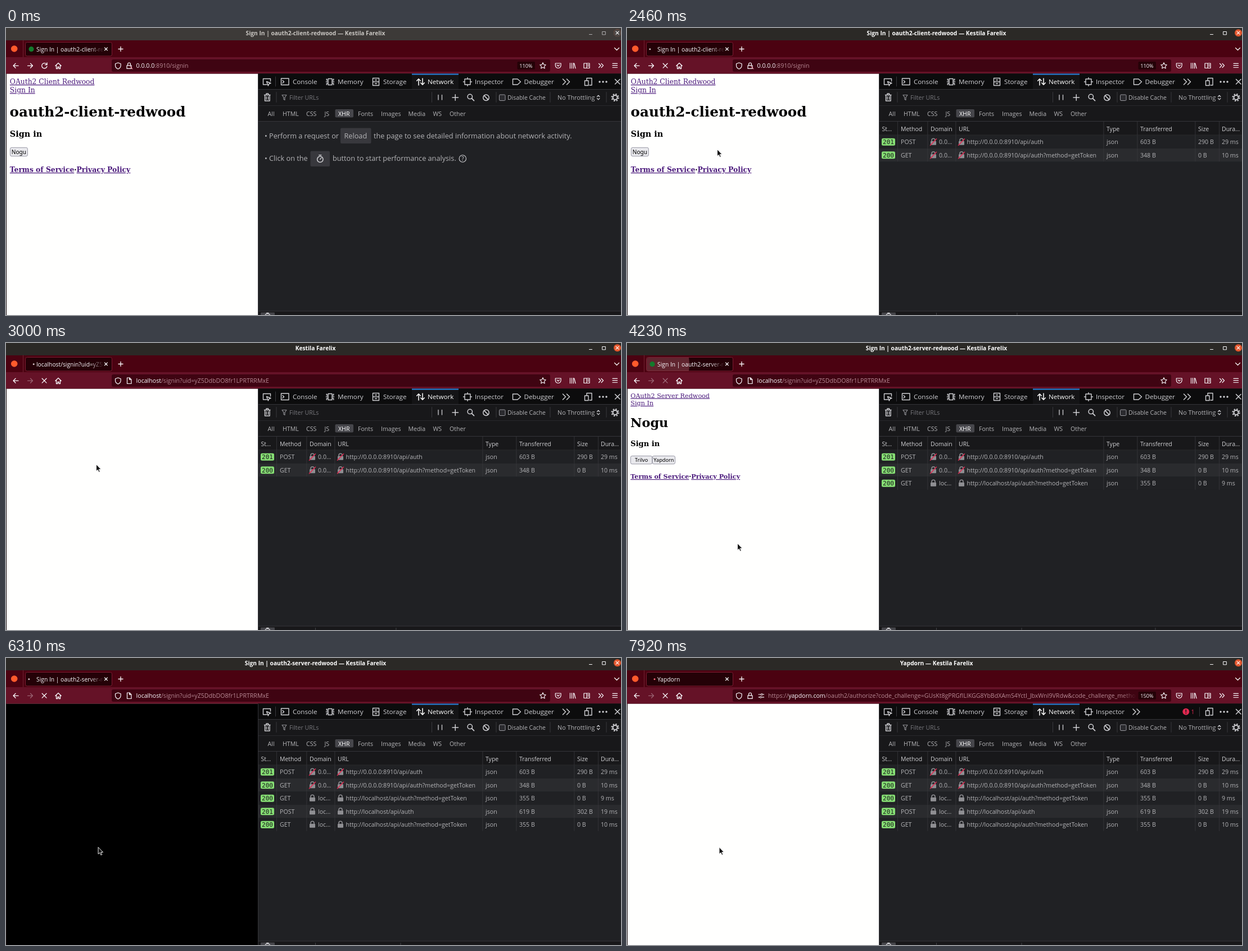
Animation of 1094x512 px, one loop 8 s. Source, as an HTML page:

```html
<!DOCTYPE html>
<html lang="en">
<head>
<meta charset="utf-8">
<title>Sign-in flow</title>
<style>
  html, body { margin: 0; width: 100%; height: 100%; overflow: hidden; background: #000; }
  svg { display: block; width: 1094px; height: 512px; }
  text { font-family: "Open Sans", "Noto Sans", sans-serif; white-space: pre; }
  .serif { font-family: "DejaVu Serif", serif; }
  .mono { font-family: "DejaVu Sans Mono", monospace; }
  .bold { font-weight: 700; }
  .link { fill: #4b1a7c; text-decoration: underline; }
</style>
</head>
<body>
<svg id="stage" viewBox="0 0 1094 512">
  <defs>
    <clipPath id="tabClip"><rect x="35" y="26" width="153" height="24" rx="3"/></clipPath>
    <clipPath id="labelClip"><rect x="54" y="26" width="119" height="24"/></clipPath>
    <clipPath id="urlClip"><rect x="230" y="56" width="675" height="22"/></clipPath>
    <linearGradient id="tabFade"><stop stop-color="#240107" stop-opacity="0"/><stop offset="1" stop-color="#240107"/></linearGradient>
    <linearGradient id="urlFade"><stop stop-color="#3f0412" stop-opacity="0"/><stop offset="1" stop-color="#3f0412"/></linearGradient>
  </defs>
</svg>
<script>
const LOOP = 8000, FPS = 13, END = LOOP + 1;
const BROWSER = 'Kestila Farelix';
const LIGHT = '#fbfbfe', PINK = '#b88a95', GREY = '#b4b4b7', ICON = '#d0d0d4';
const stage = document.getElementById('stage');
let layer = stage;
const timed = [];

function el(tag, attrs = {}, parent = layer) {
  const node = document.createElementNS('http://www.w3.org/2000/svg', tag);
  for (const key in attrs) node.setAttribute(key, attrs[key]);
  parent.appendChild(node);
  return node;
}
const rect = (x, y, width, height, fill, more) => el('rect', { x, y, width, height, fill, ...more });
const dot = (cx, cy, r, fill, more) => el('circle', { cx, cy, r, fill, ...more });
const stroke = (d, color = LIGHT, width = 1.3, more) =>
  el('path', { d, stroke: color, 'stroke-width': width, fill: 'none', 'stroke-linejoin': 'round', 'stroke-linecap': 'round', ...more });
function text(x, y, str, size, fill, more) {
  const node = el('text', { x, y, 'font-size': size, fill, ...more });
  node.textContent = str;
  return node;
}
function group(draw, attrs) {
  const outer = layer, g = el('g', attrs);
  layer = g;
  draw();
  layer = outer;
  return g;
}
// Draws a group that is visible only inside the given [from, to) spans.
function during(spans, draw) {
  const g = group(draw);
  timed.push({ g, spans });
  return g;
}
const inside = (spans, t) => spans.some(([a, b]) => t >= a && t < b);

const FOCUS = 1310, LEAVE = 2770, SERVER = 3770, ARRIVE = 4080, READY = 4690;
const LOAD1 = 1690, LOAD2 = 5850, DARK = 6310, AUTH = 6770, WHITE = 7310, ALERT = 7000;

function link(x, y, str, size) {
  text(x, y, str, size, null, { class: 'serif link' });
}
function footer(x, y, size) {
  const line = el('text', { x, y, 'font-size': size, class: 'serif bold' });
  for (const [str, cls] of [['Terms of Service', 'link'], ['·', ''], ['Privacy Policy', 'link']])
    el('tspan', { class: cls }, line).textContent = str;
}
function button(x, y, w, h, str, size, hover, press) {
  const edge = { rx: 2.6, stroke: '#8f8f9d', 'stroke-width': 0.9 };
  rect(x, y, w, h, '#e9e9ed', edge);
  if (hover) during(hover, () => rect(x, y, w, h, '#cfcfd7', { ...edge, stroke: '#676774' }));
  if (press) during(press, () => rect(x, y, w, h, '#b1b1b9', { ...edge, stroke: '#484851' }));
  text(x + w / 2, y + h / 2 + size * 0.36, str, size, '#000', { 'text-anchor': 'middle', style: 'font-family:"Noto Sans",sans-serif' });
}

// Page area
rect(0, 0, 1094, 512, '#160c0e');
rect(1, 81.5, 447, 431, '#fffffe');
during([[0, LEAVE]], () => {
  link(6.8, 100, 'OAuth2 Client Redwood', 12.32);
  link(6.8, 115.2, 'Sign In', 12.32);
  text(6.6, 158, 'oauth2-client-redwood', 24.64, '#000', { class: 'serif bold' });
  text(6.8, 194.4, 'Sign in', 14.4, '#000', { class: 'serif bold' });
  button(7.4, 213.3, 31, 15.4, 'Nogu', 10.1, [[1080, 1540]], [[1230, 1310]]);
  footer(6.8, 257, 12.32);
});
during([[SERVER, DARK]], () => {
  link(6.3, 97.6, 'OAuth2 Server Redwood', 11.2);
  link(6.3, 111, 'Sign In', 11.2);
  text(6, 150, 'Nogu', 22.4, '#000', { class: 'serif bold' });
  text(6.2, 184, 'Sign in', 13.1, '#000', { class: 'serif bold' });
  button(6.5, 201.5, 38.2, 14.4, 'Trilvo', 9.2);
  button(45.3, 201.5, 40.2, 14.4, 'Yapdorn', 9.2, [[5000, 5540]], [[5230, 5310]]);
  footer(6.3, 242, 11.2);
});
during([[DARK, WHITE]], () => rect(1, 81.5, 447, 431, '#000'));

// Title bar
rect(0, 0, 1094, 22, '#2b2926');
during([[0, FOCUS]], () => rect(0, 0, 1094, 22, '#3d3a38'));
const title = text(550.5, 12.8, '', 10.2, '#fff', { class: 'bold', 'text-anchor': 'middle' });
const buttons = group(() => {
  stroke('M1037.5 11.5h5', LIGHT, 1.1);
  stroke('M1061 6.5h5.4v5.4h-5.4z', LIGHT, 1);
});
dot(1087.5, 8.7, 6.5, '#e4572e');
during([[0, FOCUS]], () => dot(1087.5, 8.7, 6.5, '#4b4745'));
stroke('M1085 6.2l5 5m0-5l-5 5', '#fff', 1.2);

// Tab strip
rect(0, 22, 1094, 30, '#4b0211');
dot(14.7, 37, 5.8, '#ff5a2c');
stroke('M30.5 22v30', '#7b2b3a', 0.8);
rect(34.5, 25.5, 154, 24.5, '#240107', { rx: 3, stroke: '#7c1c31', 'stroke-width': 1 });
const burst = dot(45, 38, 10, '#a85160', { 'clip-path': 'url(#tabClip)' });
during([[0, LOAD1], [ARRIVE, LOAD2]], () => dot(45, 37.7, 4.6, '#137a2c'));
const spinner = dot(45, 37.8, 1.5, '#c9b3b7');
const label = text(54, 41.6, '', 10.3, LIGHT, { 'clip-path': 'url(#labelClip)' });
rect(148, 28, 26, 20, 'url(#tabFade)');
stroke('M175.4 35l5 5m0-5l-5 5', LIGHT, 1.1);
stroke('M200 37.5h8m-4-4v8', LIGHT, 1.3);
stroke('M1082.5 35.5l4 4 4-4', LIGHT, 1.2);

// Navigation bar
rect(0, 52, 1094, 29.5, '#651227');
during([[230, 380]], () => rect(6, 56, 25, 22, '#7d3044', { rx: 3 }));
stroke('M22 67.3h-9m4-4l-4 4 4 4');
const forward = stroke('M38.5 67.3h9m-4-4l4 4-4 4');
during([[0, LOAD1], [READY, LOAD2]], () => stroke('M72 64.3a4.7 4.7 0 1 0 .9 4.2M73 62v3.6h-3.6'));
const stop = during([[LOAD1, READY], [LOAD2, END]], () => stroke('M64.2 63.3l7.8 7.8m0-7.8l-7.8 7.8'));
stroke('M87.8 67.5l5.2-5 5.2 5M89.5 66.3v6.2h2.4v-3h2.2v3h2.4v-6.2');
rect(188, 56, 780, 22, '#3f0412', { rx: 3 });
stroke('M199.3 62l4.8 1.8v3.2c0 3-2 5-4.8 6.2c-2.8-1.2-4.8-3.2-4.8-6.2v-3.2z', LIGHT, 1.2);
const padlock = () => {
  stroke('M215 66.8h8v5.6h-8zM216.6 66.8v-2.4a2.4 2.4 0 0 1 4.8 0v2.4', LIGHT, 1.2);
};
function address(x, parts) {
  const line = el('text', { x, y: 71, 'font-size': 10.6, 'clip-path': 'url(#urlClip)' });
  for (const [str, fill] of parts) el('tspan', { fill }, line).textContent = str;
}
function zoom(str) {
  rect(909.5, 60, 31.5, 14, '#240107', { rx: 2 });
  text(925, 70.6, str, 9.2, LIGHT, { 'text-anchor': 'middle' });
}
during([[0, LEAVE]], () => {
  padlock();
  stroke('M221 68.5l4 4.5', '#ff9aa8', 1.1);
  address(231.6, [['0.0.0.0', LIGHT], [':8910/signin', PINK]]);
  zoom('110%');
});
during([[LEAVE, AUTH]], () => {
  stroke('M215.5 62h4.2l3.2 3.2v7.3h-7.4zM219.5 62v3.4h3.4', LIGHT, 1.2);
  address(231.6, [['localhost', LIGHT], ['/signin?uid=yZ5DdbDO8fr1LPRTRRMxE', PINK]]);
});
during([[AUTH, END]], () => {
  padlock();
  stroke('M234 65h4m3.6 0h2M234 69.8h2m4 0h3.6', LIGHT, 1.2);
  dot(239.8, 65, 1.5, 'none', { stroke: LIGHT });
  dot(237.8, 69.8, 1.5, 'none', { stroke: LIGHT });
  address(251, [['https://', PINK], ['yapdorn.com', LIGHT],
    ['/oauth2/authorize?code_challenge=GUsKt8gPRGfILlKGG8YbBdXAmS4YctI_JbxWnI9VRdw&code_challenge_method=S256', PINK]]);
  rect(880, 58, 26, 18, 'url(#urlFade)');
  zoom('150%');
});
stroke('M955 61.8l1.6 3.4 3.7.5-2.7 2.6.7 3.7-3.3-1.8-3.3 1.8.7-3.7-2.7-2.6 3.7-.5z', LIGHT, 1.1);
stroke('M977.3 63h9.8v3.6a4.9 4.9 0 0 1-9.8 0zM980 65.8l2.2 2.2 2.2-2.2', LIGHT, 1.2);
stroke('M1003.5 62.5v9.5m3-9.5v9.5m3-9.5v9.5m1.2-9l2.4 9', LIGHT, 1.2);
stroke('M1028 63h10v8.5h-10zM1033 63v8.5m1.8-6h1.6m-1.6 2.4h1.6', LIGHT, 1.2);
stroke('M1054.5 63.5l3.5 3.5-3.5 3.5m4.5-7l3.5 3.5-3.5 3.5', LIGHT, 1.2);
stroke('M1079 63.3h8.5m-8.5 3.6h8.5m-8.5 3.6h8.5', LIGHT, 1.2);

// Developer tools: panel tabs
rect(448, 81.5, 646, 431, '#202124');
rect(448, 81.5, 646, 27.5, '#0c0c0d');
rect(448, 109, 646, 57, '#18181a');
rect(448, 109, 646, 0.9, '#38383d');
rect(448, 138, 646, 0.9, '#2b2b2f');
rect(448, 166, 646, 0.9, '#38383d');
rect(448, 81.5, 0.9, 431, '#38383d');
rect(722, 81.5, 83, 27.5, '#141416');
rect(722, 81.5, 83, 2, '#2a84e0');
stroke('M464 101h-6.5v-10.5h13v4.5M463.5 95.5l7.5 3-3.2 1.2-1.4 3.2z', ICON, 1.4);
stroke('M479.5 87v17', '#38383d', 1);
const panel = (x, str, color = ICON) => text(x, 100, str, 11.65, color);
panel(510, 'Console');
stroke('M489.5 90h13.5v11.5h-13.5zM492 93.5l2.6 2.4-2.6 2.4', ICON, 1.4);
panel(590, 'Memory');
stroke('M573 90.5h7v11h-7zM573 93h-2.7v-2m2.7 5h-3.5m3.5 3h-2.7v2.2M580 93h2.7v-2m-2.7 5h3.5m-3.5 3h2.7v2.2', ICON, 1.4);
panel(671, 'Storage');
stroke('M652.5 89.5h11v13h-11zM652.5 96h11m-7-3.2h3m-3 6.5h3', ICON, 1.4);
panel(750, 'Network', '#fff');
stroke('M734 102v-11m-3.3 3.2l3.3-3.4 3.3 3.4M741 90v11m-3.3-3.2l3.3 3.4 3.3-3.4', '#fff', 1.5);
panel(834, 'Inspector');
stroke('M816 91h10v10h-10zM821 88.5v2.5m0 10v2.5m-7.5-7.5h2.5m10 0h2.5', ICON, 1.4);
const more = x => stroke(`M${x} 91l5 5-5 5m7-10l5 5-5 5`, ICON, 1.5);
during([[0, ALERT]], () => {
  stroke('M901.5 91h8.5l5.5 5-5.5 5h-8.5z', ICON, 1.4);
  panel(921.5, 'Debugger');
  more(990.5);
});
during([[ALERT, END]], () => {
  more(900);
  dot(994.3, 95.8, 6, '#e22850');
  stroke('M994.3 92.6v3.4m0 2.4v.3', '#18181a', 1.6);
  text(1003.6, 99.5, '1', 10.4, '#e22850');
  stroke('M1018.5 88v16', '#38383d', 1);
});
stroke('M1033 93v-3.5h9v12.5h-4M1029.5 94h6.5v8.5h-6.5z', ICON, 1.4);
for (const x of [1056, 1062, 1068]) dot(x, 96, 1.7, ICON);
stroke('M1083.5 91.5l8.5 8.5m0-8.5l-8.5 8.5', ICON, 1.5);

// Filter rows
const small = (x, y, str, color = GREY, size = 10.6) => text(x, y, str, size, color);
stroke('M459.5 119.5h10.5M463 119v-2h3.6v2M460.5 120v10h8.6v-10M463 122.5v5m3.6-5v5', ICON, 1.4);
for (const x of [481, 757.5, 872, 968, 1068]) stroke(`M${x} 114.5v18`, '#38383d', 1);
stroke('M491 119.5h8l-3 4.3v4.7l-2-1.3v-3.4z', '#8a8a8f', 1.2);
small(504, 127.7, 'Filter URLs', '#77777c');
stroke('M769 119.5v8.5m6.5-8.5v8.5', ICON, 1.3);
stroke('M794 124h10.5m-5.25-5.25v10.5', ICON, 1.5);
stroke('M828.5 125.6l4 4', ICON, 1.8);
dot(825.3, 122.4, 4.2, 'none', { stroke: ICON, 'stroke-width': 1.5 });
dot(854, 124.2, 5.2, 'none', { stroke: ICON, 'stroke-width': 1.5 });
stroke('M850.5 120.6l7 7', ICON, 1.5);
rect(877.5, 119, 10.5, 10.5, '#2a2a2e', { rx: 1.5, stroke: '#9a9aa0', 'stroke-width': 1 });
small(892, 127.7, 'Disable Cache', GREY, 10.4);
small(981, 127.7, 'No Throttling', GREY, 10.8);
stroke('M1051.5 122.5l2.2-2.4 2.2 2.4m-4.4 3l2.2 2.4 2.2-2.4', ICON, 1.2);
dot(1083.5, 124, 4, 'none', { stroke: ICON, 'stroke-width': 2 });
dot(1083.5, 124, 6.1, 'none', { stroke: ICON, 'stroke-width': 2, 'stroke-dasharray': '2.4 2.39' });
rect(585.5, 145, 32.5, 14.5, '#46464b', { rx: 2 });
for (const [x, str] of [[465.5, 'All'], [492, 'HTML'], [534, 'CSS'], [566.5, 'JS'], [591, 'XHR'],
  [626, 'Fonts'], [667, 'Images'], [715.5, 'Media'], [759.5, 'WS'], [789, 'Other']])
  small(x, 156.8, str, str === 'XHR' ? '#fff' : GREY);

// Empty request list
const TABLE = 1540;
const stopwatch = (x, y) => {
  dot(x, y + 1, 5.2, 'none', { stroke: ICON, 'stroke-width': 1.5 });
  stroke(`M${x - 2} ${y - 6.5}h4m-2 7.5l2-2.4`, ICON, 1.4);
};
during([[0, TABLE]], () => {
  const note = (x, y, str) => text(x, y, str, 12.7, GREY);
  note(460, 197.3, '• Perform a request or');
  rect(595, 178.5, 54.5, 27.5, '#38383d', { rx: 2 });
  note(601.5, 197.3, 'Reload');
  note(654, 197.3, 'the page to see detailed information about network activity.');
  note(460, 237, '• Click on the');
  rect(541.5, 219.5, 34.5, 27.5, '#38383d', { rx: 2 });
  stopwatch(558.8, 233.3);
  note(581, 237, 'button to start performance analysis.');
  dot(812.3, 233, 6.2, 'none', { stroke: ICON, 'stroke-width': 1.1 });
  text(812.3, 236.8, '?', 10, ICON, { 'text-anchor': 'middle' });
});

// Request table
const ROW = 23.5, TOP = 191.3, LINES = [481, 534.5, 584.5, 847.5, 907.5, 1010.5, 1053];
function lock(x, y, secure) {
  rect(x, y - 1.5, 10, 7, '#8f8f93', { rx: 1 });
  stroke(`M${x + 2} ${y - 1}v-2a3 3 0 0 1 6 0v2`, '#8f8f93', 1.5);
  if (!secure) stroke(`M${x - 0.5} ${y + 6}l11-11.5`, '#e22850', 1.5);
}
function columns(y, h) {
  for (const x of LINES) rect(x, y, 0.8, h, '#38383d');
}
during([[TABLE, END]], () => {
  rect(449, 167, 645, 24, '#18181a');
  rect(449, 190.7, 645, 0.8, '#38383d');
  columns(167, 24);
  for (const [x, str] of [[453.5, 'St…'], [487, 'Method'], [540, 'Domain'], [590, 'URL'], [853, 'Type'],
    [913, 'Transferred'], [1016, 'Size'], [1058, 'Dura…']]) small(x, 183.7, str, '#cfcfd2', 10.5);
});
const TOKEN = '/api/auth?method=getToken';
[
  [TABLE, 201, 'POST', '0.0.0.0:8910', '/api/auth', 603, 290, 29],
  [1770, 200, 'GET', '0.0.0.0:8910', TOKEN, 348, 0, 10],
  [3920, 200, 'GET', 'localhost', TOKEN, 355, 0, 9],
  [5540, 201, 'POST', 'localhost', '/api/auth', 619, 302, 19],
  [LOAD2, 200, 'GET', 'localhost', TOKEN, 355, 0, 10],
].forEach(([from, code, method, host, path, sent, size, ms], i) => during([[from, END]], () => {
  const y = TOP + ROW * i, mid = y + 12, base = mid + 3.8, secure = host === 'localhost';
  rect(449, y, 645, ROW, i % 2 ? '#2a2b2e' : '#202124');
  columns(y, ROW);
  rect(453, mid - 6.5, 24, 13, '#86de74', { rx: 2.5 });
  text(465, mid + 4, code, 11, '#18181a', { class: 'mono', 'text-anchor': 'middle' });
  lock(540, mid, secure);
  lock(590, mid, secure);
  for (const [x, str] of [[487, method], [555, host.slice(0, 3) + '…'], [604.5, `http://${host}${path}`],
    [853, 'json'], [913, sent + ' B'], [1016, size + ' B'], [1058, ms + ' ms']]) small(x, base, str);
}));

// Status strip
rect(449, 505, 645, 7, '#18181a');
rect(449, 504.6, 645, 0.9, '#38383d');
rect(453, 507.5, 25, 5, '#46464b', { rx: 1 });
dot(465.3, 514, 4.5, 'none', { stroke: ICON, 'stroke-width': 1.4 });
stroke('M463.5 508.3h3.6', ICON, 1.3);
for (const [x, from, to] of [[550, TABLE, END], [693.5, 1770, 3920], [701.5, 3920, END], [939.5, ARRIVE, 5540]])
  during([[from, to]], () => rect(x, 508, 0.9, 4, '#4a4a4f'));

const cursor = el('path', { d: 'M0 0V12.2L2.8 9.8L4.8 14L6.8 13.1L4.9 9H8.6Z', fill: '#161616', stroke: '#fff', 'stroke-width': 0.9 });

// [time, x, y, glide]
const MOVES = [
  [230, 20, 46], [380, 21, 86], [460, 23, 125], [620, 23, 157], [850, 23, 163], [1000, 24, 190], [1080, 24, 214],
  [1460, 24, 214], [2080, 160.5, 216.5, 1], [3460, 160.5, 216.5], [4230, 196.5, 357.5, 1],
  [5000, 66, 213, 1], [5150, 68, 212], [5230, 69, 211], [5460, 69, 211], [6230, 164, 337.5, 1],
];
const TITLES = [
  [0, 'Sign In | oauth2-client-redwood'], [LEAVE, ''],
  [3690, 'Sign In | oauth2-server-redwood'], [6850, 'Yapdorn'],
];
const latest = (steps, t) => steps.filter(s => s[0] <= t).pop();
const ease = p => p * p * (3 - 2 * p);

function pointer(t) {
  const now = latest(MOVES, t);
  if (!now) return null;
  const next = MOVES[MOVES.indexOf(now) + 1];
  const p = next && next[3] ? ease((t - now[0]) / (next[0] - now[0])) : 0;
  return [1, 2].map(i => now[i] + (p ? (next[i] - now[i]) * p : 0));
}
function setText(node, str) {
  if (node.textContent !== str) node.textContent = str;
}

function draw(t) {
  for (const { g, spans } of timed) g.style.display = inside(spans, t) ? '' : 'none';

  const name = latest(TITLES, t)[1];
  setText(title, name ? `${name} — ${BROWSER}` : BROWSER);
  setText(label, name || 'localhost/signin?uid=yZ5DdbDO8fr');
  title.setAttribute('fill', t < FOCUS ? '#c9c6c2' : '#fff');
  buttons.style.opacity = t < FOCUS ? 0.6 : 1;
  forward.style.opacity = t < LEAVE ? 1 : 0.35;
  stop.style.opacity = inside([[ARRIVE, READY]], t) ? 0.4 : 1;

  const left = t < LOAD2 ? 2480 : 6290;
  spinner.style.display = inside([[LOAD1, ARRIVE], [LOAD2, END]], t) ? '' : 'none';
  spinner.setAttribute('cx', 45 - 4.2 * Math.cos((t - left) / 1050 * 2 * Math.PI));
  spinner.setAttribute('fill', t < AUTH ? '#d3bfc3' : '#ff6b7d');

  const p = (t - ARRIVE) / 375;
  burst.style.display = p >= 0 && p < 1 ? '' : 'none';
  burst.setAttribute('r', 10 + 140 * Math.max(p, 0));
  burst.style.opacity = 0.75 * (1 - p);

  const at = pointer(t);
  cursor.style.display = at ? '' : 'none';
  if (at) cursor.setAttribute('transform', `translate(${at[0]} ${at[1]})`);
}

const start = performance.now();
function tick() {
  const t = (performance.now() - start) % LOOP;
  const step = Math.floor((t + 6) * FPS / 1000);
  draw(Math.round(step * 100 / FPS) * 10 % LOOP);
  requestAnimationFrame(tick);
}
tick();
</script>
</body>
</html>
```
